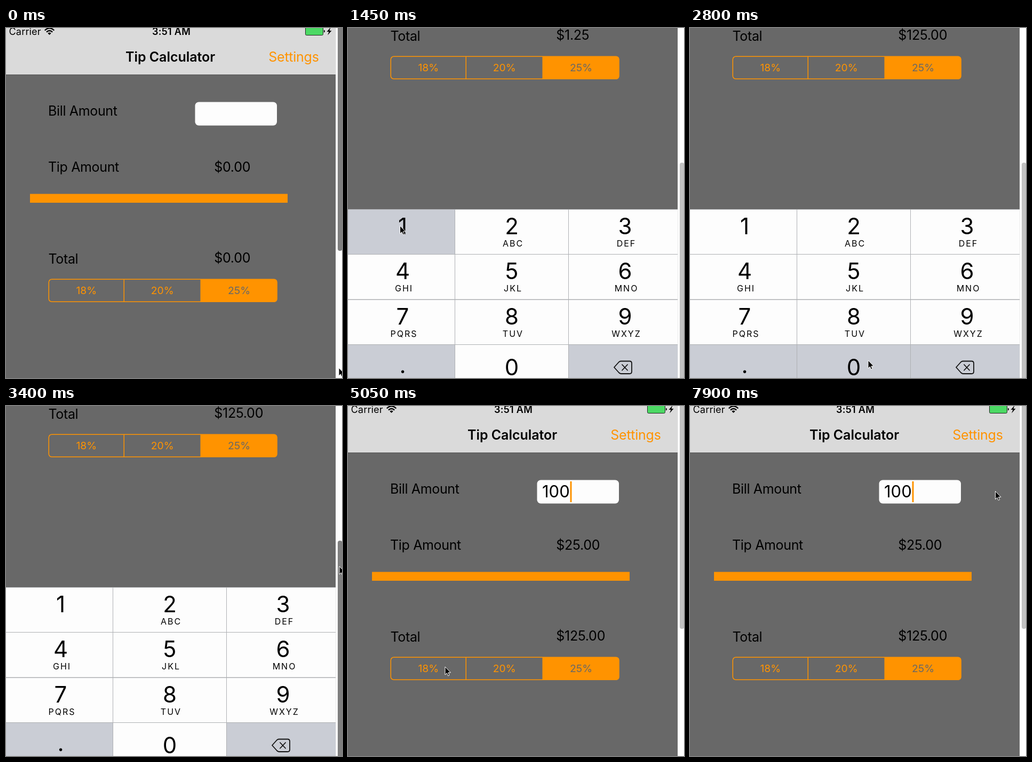
Animation, 630 px wide and 655 px high, one loop 8 s. Source, as an HTML page:

```html
<!DOCTYPE html>
<html lang="en">
<head>
<meta charset="utf-8">
<title>Tip Calculator</title>
<style>
  html, body { margin: 0; width: 100%; height: 100%; overflow: hidden; background: #fdfdfd; }
  svg { display: block; width: 630px; height: 655px; }
  text { font: 400 25px Inter, Roboto, sans-serif; letter-spacing: -.25px; white-space: pre; }
  .label { letter-spacing: -.35px; }
  .title { font-weight: 600; letter-spacing: -.05px; }
  .status { font-size: 18px; letter-spacing: .2px; }
  .clock { font-weight: 600; letter-spacing: .3px; }
  .bill { font-size: 31px; letter-spacing: 0; }
  .segment { font-size: 19.3px; letter-spacing: 0; text-anchor: middle; }
  .digit { font-size: 42px; letter-spacing: 0; text-anchor: middle; }
  .letters { font-size: 16px; letter-spacing: 2px; text-anchor: middle; }
  .orange { fill: #ff9300; }
</style>
</head>
<body>
<svg viewBox="0 0 630 655">
  <defs>
    <clipPath id="pill"><rect x="80" y="470" width="428.500" height="43" rx="6"/></clipPath>
    <clipPath id="screen"><rect width="618" height="655"/></clipPath>
  </defs>
  <g clip-path="url(#screen)">
    <g id="page">
      <rect y="-10" width="618" height="1200" fill="#686868"/>
      <rect y="-10" width="618" height="97" fill="#dadada"/>
      <rect y="87" width="618" height="1" fill="#585858"/>

      <text class="status" x="5.500" y="13">Carrier</text>
      <path d="M72.700 4.500Q81.500 -4 90.300 4.500M75.900 7.700Q81.500 2.300 87.100 7.700" fill="none" stroke="#000" stroke-width="2.300"/>
      <path d="M78.300 9.800Q81.500 7 84.700 9.800L81.500 13Z"/>
      <text class="status clock" x="274" y="13">3:51 AM</text>
      <rect x="561.500" y="-4" width="33" height="17.500" rx="2" fill="#4cd964" stroke="#222"/>
      <path d="M596 3.500q2 .5 2 2.500t-2 2.500z"/>
      <path d="M608.500 -1L601.500 7H605.500L603 13.500L610.500 5H606.500Z"/>

      <text class="title" x="224" y="63">Tip Calculator</text>
      <text class="orange" x="492.300" y="63">Settings</text>

      <text class="label" x="79" y="163.500">Bill Amount</text>
      <rect x="354.500" y="138.500" width="153.500" height="44" rx="7" fill="#fdfdfd"/>
      <text id="bill" class="bill" x="364" y="171"></text>
      <rect id="caret" class="orange" x="416.500" y="141" width="3" height="39"/>

      <text class="label" x="79" y="268.500">Tip Amount</text>
      <text id="tip" x="390.200" y="269"></text>
      <rect class="orange" x="45" y="310.500" width="483" height="16.500"/>
      <text class="label" x="79.500" y="441">Total</text>
      <text id="total" x="390.200" y="439.200"></text>

      <g id="segments" clip-path="url(#pill)"></g>
      <path d="M221.250 470V513M365.250 470V513" stroke="#ff9300" stroke-width="1.500"/>
      <rect x="80.250" y="470.250" width="427.750" height="42" rx="5.500" fill="none" stroke="#ff9300" stroke-width="1.500"/>

      <g id="keypad" transform="translate(0 756)"></g>
    </g>
  </g>
  <rect x="618" width="12" height="655" fill="#fdfdfd"/>
  <rect x="618" width="1" height="655" fill="#ececec"/>
  <rect id="thumb" x="622" width="8.500" height="423" rx="4"/>
  <path id="cursor" d="M0 0V15L3.400 11.800L5.700 17L8 16L5.900 10.900H10.500Z" stroke="#fff"/>
</svg>
<script>
const LOOP = 8000, REFRESH = 150, KEYPAD_SCROLL = 417;
const ORANGE = [255, 147, 0], GRAY = [104, 104, 104];
const RATES = [0.18, 0.2, 0.25];
const $ = id => document.getElementById(id);
const clamp = v => Math.min(1, Math.max(0, v));

function add(parent, tag, attrs, text = '') {
  const node = document.createElementNS('http://www.w3.org/2000/svg', tag);
  for (const name in attrs) node.setAttribute(name, attrs[name]);
  node.textContent = text;
  return parent.appendChild(node);
}

const edges = [80, 221, 365, 508.5];
const segments = RATES.map((rate, i) => ({
  fill: add($('segments'), 'rect', { x: edges[i], y: 470, width: edges[i + 1] - edges[i], height: 43, class: 'orange' }),
  label: add($('segments'), 'text', { x: (edges[i] + edges[i + 1]) / 2 + 0.3, y: 498.3, class: 'segment' }, rate * 100 + '%')
}));

const keys = {};
const captions = ' ABC DEF GHI JKL MNO PQRS TUV WXYZ'.split(' ');
const centers = [102.5, 307, 519.5];
[...'123456789.0⌫'].forEach((name, i) => {
  const pad = $('keypad'), col = i % 3, row = Math.floor(i / 3);
  const left = 213 * col - 12.5, top = Math.round(84.3 * row) + 0.5;
  keys[name] = add(pad, 'rect', { x: left, y: top, width: 213, height: 84.5, stroke: '#aeb0b3' });
  if (name === '⌫') return;
  const baseline = top + (row < 3 ? 46.5 : 57.5);
  add(pad, 'text', { x: centers[col], y: baseline, dy: name === '.' ? -4 : 0, class: 'digit' }, name);
  if (captions[i]) add(pad, 'text', { x: centers[col] + 2.5, y: baseline + 23, class: 'letters' }, captions[i]);
});
add($('keypad'), 'path', {
  d: 'M499 296L508 286Q510 284.500 512 284.500H528Q532 284.500 532 288.500V304Q532 308 528 308H512Q510 308 508 306ZM514 291L524 301.500M524 291L514 301.500',
  fill: 'none', stroke: '#111', 'stroke-width': 1.8, 'stroke-linejoin': 'round', 'stroke-linecap': 'round'
});

// Where the pointer rests; it glides from one stop to the next.
const stops = [
  { from: 0, to: 428, x: 624, y: 636 },
  { from: 1150, to: 1750, x: 97.5, y: 370 },
  { from: 2350, to: 2950, x: 334, y: 622 },
  { from: 3400, to: 3850, x: 625, y: 300 },
  { from: 4000, to: 4300, x: 625, y: 30 },
  { from: 4950, to: 5650, x: 182, y: 488 },
  { from: 6100, to: 6700, x: 276, y: 487 },
  { from: 7150, to: 7750, x: 430, y: 487 },
  { from: 7900, to: LOOP, x: 572.5, y: 159.5 }
];
const taps = [{ at: 1450, key: '1' }, { at: 2500, key: '0' }, { at: 2800, key: '0' }];
const picks = [{ at: -REFRESH, index: 2 }, { at: 5350, index: 0 }, { at: 6400, index: 1 }, { at: 7300, index: 2 }];

const mix = (a, b, k) => `rgb(${a.map((v, i) => Math.round(v + (b[i] - v) * k))})`;
const money = amount => '$' + amount.toFixed(2);

// The screen refreshes in coarse ticks, slightly faster at first.
function tickAt(t) {
  const [origin, step] = t < 1150 ? [140, 144.3] : [1150, REFRESH];
  return Math.max(0, origin + step * Math.floor((t - origin) / step));
}

function pointerAt(t) {
  const i = stops.findLastIndex(stop => stop.from <= t);
  const a = stops[i], b = stops[i + 1] || a;
  const k = a === b ? 0 : clamp((t - a.to) / (b.from - a.to));
  return { x: a.x + (b.x - a.x) * k, y: a.y + (b.y - a.y) * k };
}

const scrollAt = t => KEYPAD_SCROLL * clamp(t / 140) * clamp(1 - (t - 3850) / 226);
const caretAt = t => clamp(0.73 + 1.5 * Math.cos(2 * Math.PI * (t - 120) / 1000));

function render(time) {
  const t = tickAt((time + 0.5) % LOOP);
  const scroll = scrollAt(t), pointer = pointerAt(t);
  $('page').setAttribute('transform', `translate(0 ${-scroll})`);
  $('thumb').setAttribute('y', -6 + scroll * 0.619);
  $('thumb').setAttribute('fill', pointer.x > 618 ? '#7f7f7f' : '#c1c1c1');
  $('cursor').setAttribute('transform', `translate(${pointer.x} ${pointer.y})`);

  const typed = taps.filter(tap => tap.at <= t);
  const digits = typed.map(tap => tap.key).join('');
  const pressed = typed.find(tap => t < tap.at + REFRESH)?.key;
  for (const name in keys) {
    keys[name].setAttribute('fill', name === '.' || name === '⌫' || name === pressed ? '#cacdd5' : '#fdfdfd');
  }

  const p = picks.findLastIndex(pick => pick.at <= t);
  const selected = picks[p].index, previous = picks[p - 1]?.index;
  const blend = t < picks[p].at + REFRESH ? 0.77 : 1;
  segments.forEach(({ fill, label }, i) => {
    const on = i === selected ? blend : i === previous ? 1 - blend : 0;
    fill.setAttribute('opacity', on);
    label.setAttribute('fill', mix(ORANGE, GRAY, on));
  });

  const bill = Number(digits), tip = bill * RATES[selected];
  $('bill').textContent = digits;
  $('caret').setAttribute('opacity', digits ? caretAt(t) : 0);
  $('tip').textContent = money(tip);
  $('total').textContent = money(bill + tip);
}

const start = performance.now();
function loop() {
  render(performance.now() - start);
  requestAnimationFrame(loop);
}
loop();
</script>
</body>
</html>
```
